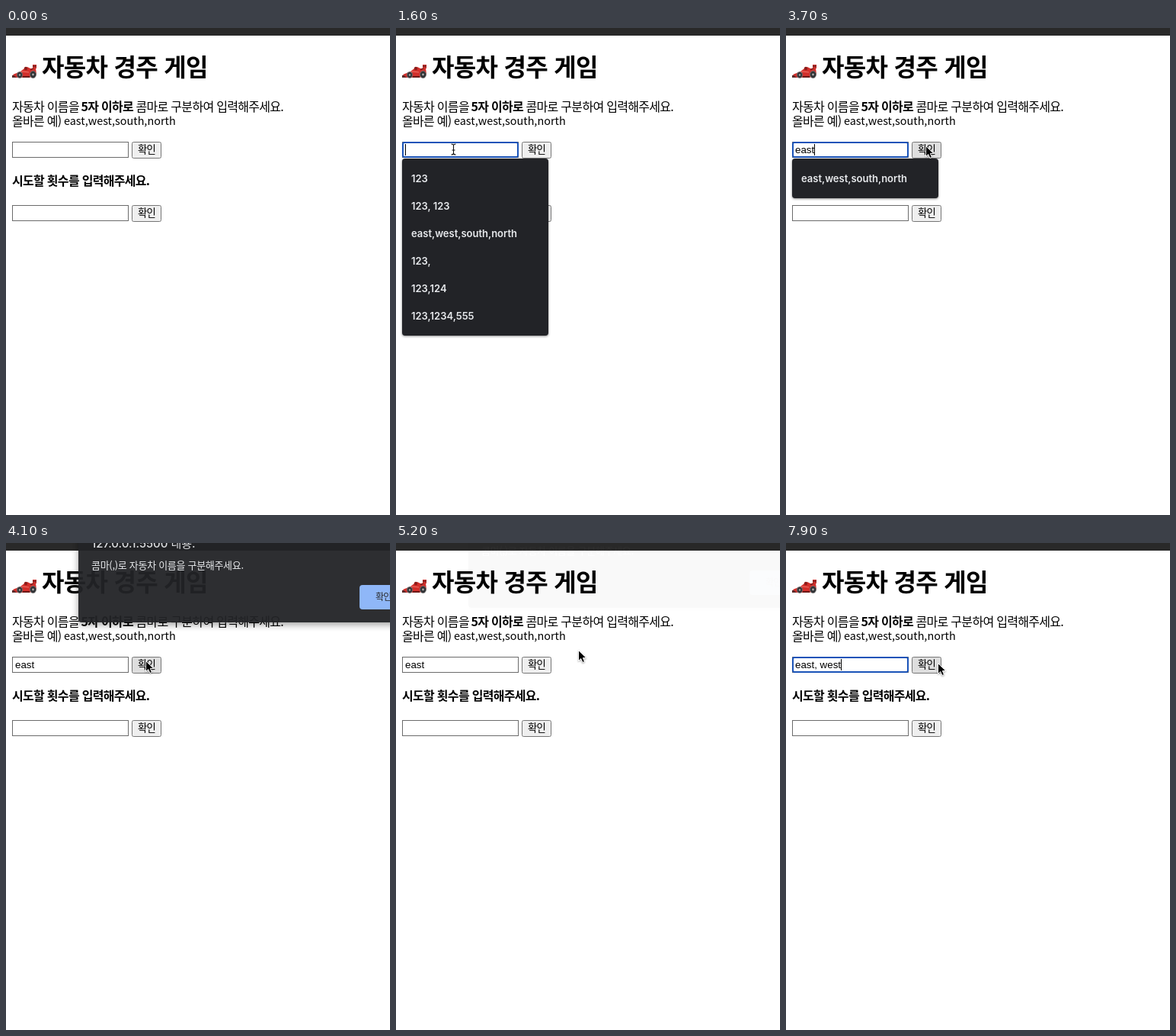
Recreate the animation shown at these times as an HTML page. Size 504x638 px, loop 8 s.

```html
<!DOCTYPE html>
<html lang="ko">
<head>
<meta charset="utf-8">
<title>자동차 경주 게임</title>
<style>
html, body { margin: 0; width: 100%; height: 100%; overflow: hidden; background: #fff; }
svg { display: block; }
text { font: 16px "Noto Sans CJK KR", "Noto Sans CJK", "Noto Sans", sans-serif; letter-spacing: -.7px; white-space: pre; }
.b { font-weight: 700; }
.h1 { font-size: 32px; font-weight: 700; }
.latin { font-size: 14.4px; letter-spacing: 0; }
.btn { font-size: 13.33px; }
.field { fill: #fff; stroke: #6b6b6b; }
.button { fill: #efefef; stroke: #767676; }
#typed { font: 13.333px "Liberation Sans", Arial, sans-serif; letter-spacing: 0; }
#list text { font: 600 13px Inter, sans-serif; letter-spacing: 0; fill: #e8eaed; }
#list rect { fill: #222327; filter: drop-shadow(0 1px 1.5px rgba(0,0,0,.45)); }
#dialog text { fill: #e8eaed; }
#panel { fill: #222326; filter: drop-shadow(0 3px 5px rgba(0,0,0,.4)); }
#dialog .title { font: 500 15px Inter, "Noto Sans CJK KR", sans-serif; letter-spacing: 0; }
#dialog .msg { font-size: 13px; letter-spacing: -.3px; }
#dialog .ok { font-size: 12px; font-weight: 500; fill: #202124; }
</style>
</head>
<body>
<svg width="504" height="638" viewBox="0 0 504 638">
  <rect width="504" height="638" fill="#fff"/>
  <rect width="504" height="10" fill="#292929"/>

  <g id="car">
    <path d="M8 62l6-1 1 4H8z" fill="#5b2a2a"/>
    <path d="M9 61l10-4 5-4 4-2 4 2 7-1 1 9-9 4H14z" fill="#d32f2b"/>
    <path d="M35 48h5v5h-5z" fill="#c8302d"/>
    <path d="M35 50h5M36 53l-4 2" stroke="#4a1c1c"/>
    <circle cx="26" cy="53" r="2.2" fill="#8c1d1b"/>
    <path d="M14 60l8-3 8 1" fill="none" stroke="#f0736a"/>
    <path d="M22 64h9" stroke="#6b1716" stroke-width="2"/>
    <g fill="#303134" stroke="#777" stroke-width=".8">
      <ellipse cx="18" cy="61.5" rx="3.6" ry="4"/>
      <ellipse cx="35.5" cy="61" rx="4" ry="4.6"/>
    </g>
    <circle cx="18" cy="61.5" r="1.2" fill="#aaa"/>
    <circle cx="35.5" cy="61" r="1.4" fill="#aaa"/>
  </g>

  <text class="h1" x="47" y="63">자동차 경주 게임</text>
  <text x="8" y="109">자동차 이름을</text>
  <text class="b" x="98.5" y="109">5자 이하로</text>
  <text x="170.5" y="109">콤마로 구분하여 입력해주세요.</text>
  <text x="8" y="128">올바른 예)</text>
  <text class="latin" x="76" y="127">east,west,south,north</text>
  <text class="b" x="8" y="206">시도할 횟수를 입력해주세요.</text>

  <rect class="field" x="8.5" y="149.5" width="152" height="20"/>
  <rect id="btn" class="button" x="165.5" y="149.5" width="38" height="21" rx="2"/>
  <text class="btn" x="173" y="164">확인</text>
  <rect class="field" x="8.5" y="232.5" width="152" height="20"/>
  <rect class="button" x="165.5" y="232.5" width="38" height="21" rx="2"/>
  <text class="btn" x="173" y="247">확인</text>

  <rect id="ring" x="9" y="150" width="151" height="19" rx="2" fill="none" stroke="#1a53b8" stroke-width="2"/>
  <text id="typed" x="12" y="164"></text>
  <rect id="caret" y="152" width="1" height="15"/>
  <g id="list"><rect x="8" y="171" width="192" rx="4"/></g>

  <g id="dialog">
    <rect id="panel" x="95" y="-60" width="430" height="165" rx="4"/>
    <text class="title" x="112" y="7">127.0.0.1:5500 내용:</text>
    <text class="msg" x="112" y="35">콤마(,)로 자동차 이름을 구분해주세요.</text>
    <rect id="ok" x="464" y="56" width="64" height="32" rx="4"/>
    <text class="ok" x="485" y="76">확인</text>
  </g>

  <path id="arrow" d="M.5 .5V14.5l3.2-3 2.2 5 2.6-1.1-2.1-4.9h4.4z" stroke="#fff"
    style="filter:drop-shadow(0 1px 1px rgba(0,0,0,.35))"/>
  <g id="beam" fill="none">
    <path d="M-3-7q3 0 3 2V5q0 2-3 2M3-7q-3 0-3 2M0 5q0 2 3 2M-2 1h4" stroke="#fff" stroke-width="2.4"/>
    <path d="M-3-7q3 0 3 2V5q0 2-3 2M3-7q-3 0-3 2M0 5q0 2 3 2M-2 1h4" stroke="#111" stroke-width="1.1"/>
  </g>
</svg>
<script>
const LOOP = 8000, TICK = 100;
const $ = id => document.getElementById(id);
const show = (el, on) => { el.style.display = on ? '' : 'none'; };
const within = (t, ...spans) => spans.some(([a, b]) => t >= a && t < b);
const last = (table, t) => table.filter(row => row[0] <= t).pop();

const typing = [[0, ''], [2100, 'e'], [2300, 'ea'], [2400, 'eas'], [2500, 'east'],
  [6300, 'east,'], [6400, 'east, '], [6500, 'east, w'], [6600, 'east, we'],
  [6800, 'east, wes'], [6900, 'east, west']];

// time, x, y of the pointer
const path = [[500, 331, 341], [600, 331, 341], [800, 300, 318], [1100, 180, 230], [1400, 82, 164],
  [1500, 75, 159], [3100, 75, 159], [3300, 120, 154], [3500, 193, 144], [3600, 186, 151],
  [3700, 183, 154], [4100, 183, 154], [4400, 320, 115], [4700, 465, 73], [4800, 473, 70],
  [5000, 473, 70], [5100, 390, 100], [5200, 239, 140], [5300, 185, 152], [5500, 157, 159],
  [7300, 157, 159], [7400, 168, 143], [7500, 194, 146], [7600, 208, 149], [7700, 212, 150],
  [7800, 212, 150], [7900, 199, 157]];

// time, opacity, vertical shift of the alert
const alertSteps = [[0, 0, 0], [4000, .4, -10], [4100, .95, -1], [4200, 1, 0],
  [5100, .45, -9], [5200, .02, -20], [5300, 0, 0]];

const entries = ['123', '123, 123', 'east,west,south,north', '123,', '123,124', '123,1234,555'];
const rows = entries.map((s, i) => {
  const row = document.createElementNS('http://www.w3.org/2000/svg', 'text');
  row.textContent = s;
  row.setAttribute('x', 20);
  $('list').append(row);
  return row;
});

function pointer(t) {
  const a = last(path, t) || path[0];
  const b = path[path.indexOf(a) + 1] || a;
  const k = a === b ? 0 : Math.max(0, (t - a[0]) / (b[0] - a[0]));
  return [1, 2].map(i => Math.round(a[i] + (b[i] - a[i]) * k));
}

function drawList(t) {
  const full = t < 2200;
  show($('list'), within(t, [1600, 3800], [5700, 6400]));
  $('list').firstElementChild.setAttribute('height', full ? 232 : 52);
  rows.forEach((row, i) => {
    show(row, full || i === 2);
    row.setAttribute('y', 202 + (full ? i * 36 : 0));
  });
}

function drawPointer(t) {
  const [x, y] = pointer(t);
  const visible = within(t, [500, 2000], [3200, 6000], [7400, LOOP]);
  const inRow = y >= 149 && y <= 170;
  const overField = inRow && x >= 8 && x <= 161;
  show($('arrow'), visible && !overField);
  show($('beam'), visible && overField);
  $('arrow').setAttribute('transform', `translate(${x} ${y})`);
  $('beam').setAttribute('transform', `translate(${x + .5} ${y})`);
  $('btn').style.fill = visible && inRow && x >= 165 && x <= 203 ? '#dedede' : '';
}

function draw(t) {
  const focused = within(t, [1600, 3800], [5700, LOOP]);
  $('typed').textContent = last(typing, t)[1];
  show($('ring'), focused);
  show($('caret'), focused && !within(t, [3000, 3500], [6100, 6300], [7400, 7900]));
  $('caret').setAttribute('x', Math.round(12 + $('typed').getComputedTextLength()));
  drawList(t);

  const [, alpha, dy] = last(alertSteps, t);
  show($('dialog'), alpha > 0);
  $('dialog').setAttribute('opacity', alpha);
  $('dialog').setAttribute('transform', `translate(0 ${dy})`);
  $('ok').setAttribute('fill', t >= 4900 ? '#6d8bc8' : t >= 4700 ? '#7fa4e6' : '#8ab4f8');
  drawPointer(t);
}

const start = performance.now();
function frame() {
  const t = (performance.now() - start) % LOOP;
  draw(Math.floor(t / TICK) * TICK);
  requestAnimationFrame(frame);
}
frame();
</script>
</body>
</html>
```
